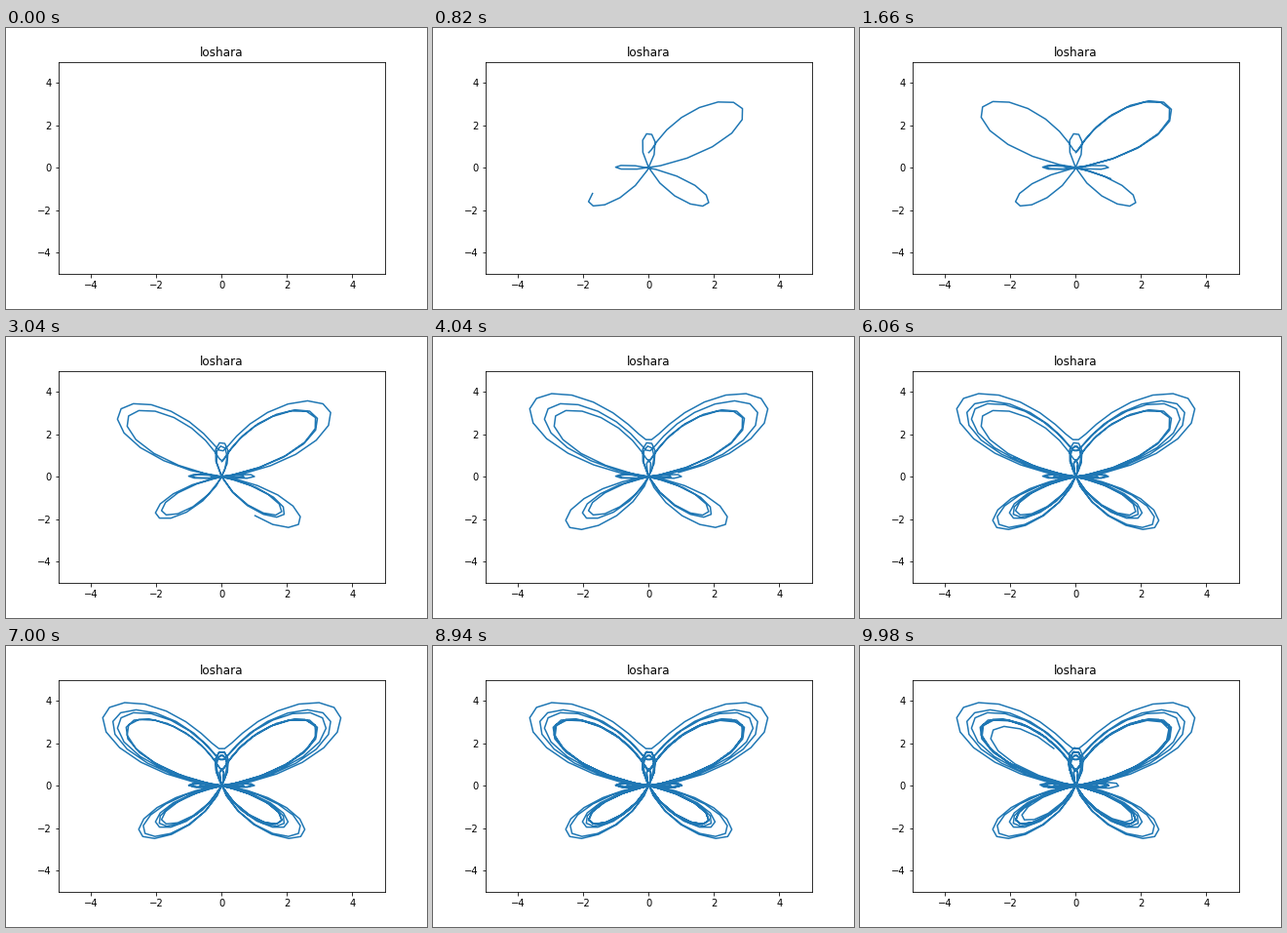
Write a matplotlib script that moves like this. It is 432x288 px and loops after 10000 ms.

```python
import numpy as np
import matplotlib.pyplot as plt
from matplotlib.animation import FuncAnimation

FRAMES = 500
INTERVAL = 20
STEP = 0.1

# Butterfly curve in polar form, angle measured from the vertical axis
t = STEP * np.arange(FRAMES)
r = np.exp(np.cos(t)) - 2 * np.cos(4 * t) + np.sin(t / 12) ** 5
x, y = r * np.sin(t), r * np.cos(t)

fig, ax = plt.subplots(figsize=(6, 4), dpi=72)
fig.subplots_adjust(bottom=0.125)
ax.set(xlim=(-5, 5), ylim=(-5, 5), title="loshara")
line, = ax.plot([], [], lw=1.5, color="tab:blue")


def init():
    line.set_data([], [])
    return line,


def update(i):
    line.set_data(x[:i + 1], y[:i + 1])
    return line,


anim = FuncAnimation(fig, update, frames=FRAMES, init_func=init,
                     interval=INTERVAL, blit=True, repeat=True)
plt.show()
```
